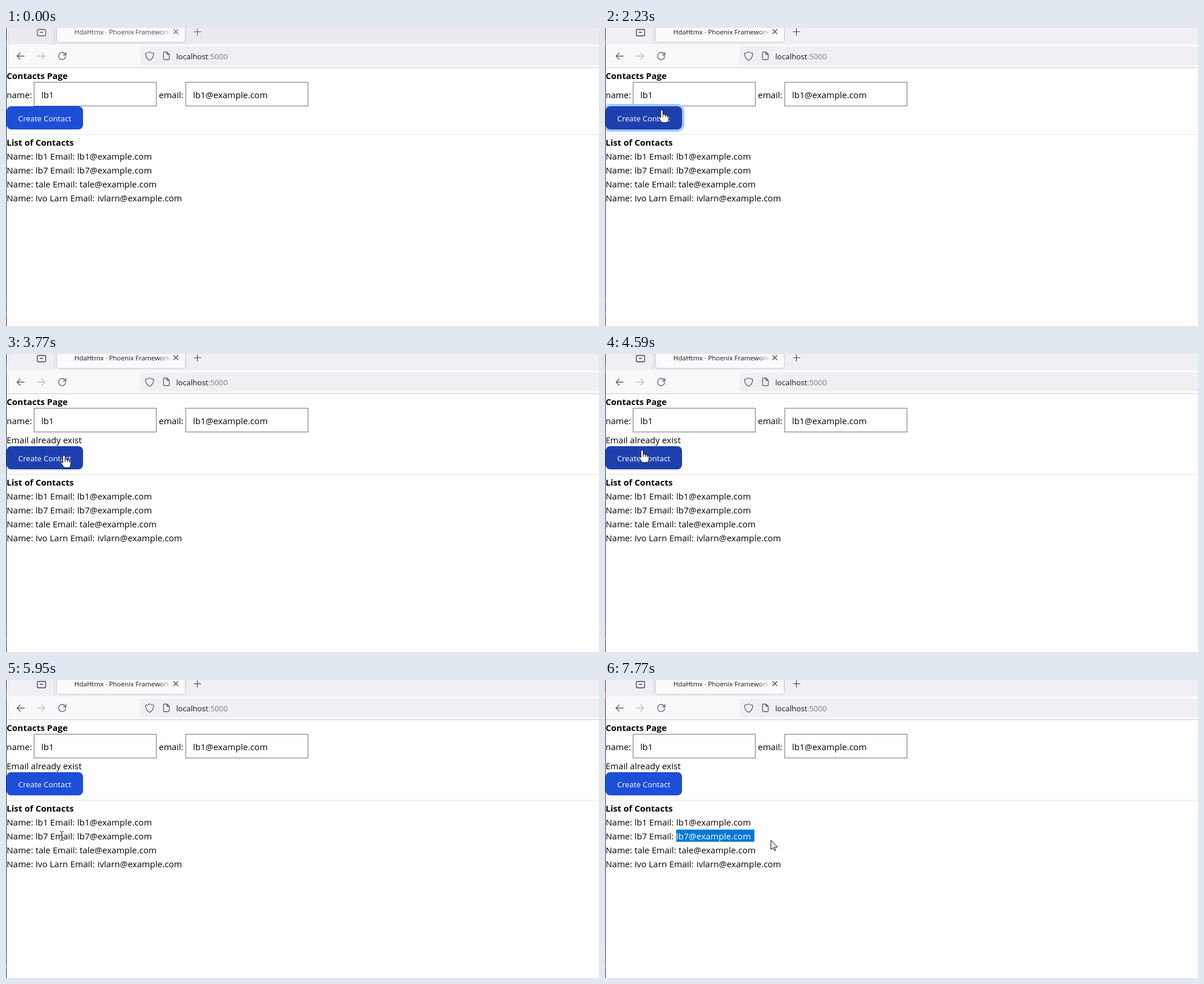
Write an HTML page that moves like this. It is 1024 by 514 pixels and loops after 8000 ms.

```html
<!DOCTYPE html>
<html lang="en">
<head>
<meta charset="utf-8">
<title>Contacts Page</title>
<style>
  html, body { margin: 0; width: 100%; height: 100%; overflow: hidden; background: #fff; }
  #stage { display: block; width: 1024px; height: 514px; }
  text { font: 15px "Open Sans", "Noto Sans", sans-serif; fill: #000; white-space: pre; }
  .bold { font-weight: 700; }
  .icon { fill: none; stroke: #5b5b66; stroke-width: 1.3; stroke-linecap: round; stroke-linejoin: round; }
  .field { fill: #fff; stroke: #6b7280; }
  #strip { fill: #ebebef; }
  #title { font-size: 11.4px; fill: #46464e; }
  .active #strip { fill: #f0f0f4; }
  .active #title { fill: #15141a; }
  .active .tabicon { stroke: #3a3a44; }
  #url { font-size: 13.2px; fill: #15141a; }
  #url tspan { fill: #7c7c85; }
  #label { font-size: 13.3px; fill: #fff; }
  #button { fill: #1d4ed8; }
  #button.hover { fill: #1e40af; }
  #ring { fill: none; stroke: #a4cafe; stroke-width: 4; }
  #picked text { fill: #fff; }
  #cursor path { fill: #fff; stroke: #000; stroke-linejoin: round; }
  #cursor #beam { fill: none; }
</style>
</head>
<body>
<svg id="stage" viewBox="0 0 1024 514">
  <defs>
    <linearGradient id="fade">
      <stop offset="0" stop-color="#fbfbfd" stop-opacity="0"/>
      <stop offset="1" stop-color="#fbfbfd"/>
    </linearGradient>
    <filter id="shadow" x="-5%" y="-30%" width="110%" height="160%">
      <feDropShadow dx="0" dy="0" stdDeviation="1.6" flood-color="#000" flood-opacity=".35"/>
    </filter>
  </defs>

  <g id="chrome">
    <rect id="strip" width="1024" height="28"/>
    <path d="M83.5 0V27" stroke="#cfcfd6"/>
    <rect x="88" y="-12" width="221" height="36" rx="4" fill="#fbfbfd" filter="url(#shadow)"/>
    <text id="title" x="118" y="11">HdaHtmx · Phoenix Framework</text>
    <rect x="264" y="0" width="21" height="16" fill="url(#fade)"/>
    <g class="icon tabicon">
      <path d="M56 2.5H66.5Q68.5 2.5 68.5 4.5V11.5Q68.5 13.5 66.5 13.5H56Q54 13.5 54 11.5V4.5Q54 2.5 56 2.5ZM59 7.5H63.5"/>
      <path d="M289.5 2.5L297 10M297 2.5L289.5 10" stroke-width="1.1"/>
      <path d="M330.5 1V12.5M325 6.5H336.5" stroke-width="1.1"/>
    </g>
    <rect y="28" width="1024" height="40" fill="#f9f9fb"/>
    <rect x="232" y="32" width="800" height="32" rx="4" fill="#f0f0f4"/>
    <path d="M0 68.5H1024" stroke="#cccccf"/>
    <g class="icon">
      <path d="M19 48.5H31.5M24.5 43L19 48.5L24.5 54"/>
      <path d="M54 48.5H67M61.5 43L67 48.5L61.5 54" stroke="#bdbdc3"/>
      <path d="M102.5 45.5A6.2 6.2 0 1 0 103.2 49M103.5 42V46.5H99"/>
      <path d="M248 41.2Q251 43 254.8 43.4Q255.5 52 248 55.8Q240.5 52 241.2 43.4Q245 43 248 41.2Z"/>
      <path d="M272 43Q272 41.5 273.5 41.5H278L282 45.5V53Q282 54.5 280.5 54.5H273.5Q272 54.5 272 53ZM278 41.5V45.5H282"/>
    </g>
    <text id="url" x="294" y="54">localhost<tspan>:5000</tspan></text>
  </g>

  <text class="bold" x="1" y="88">Contacts Page</text>
  <text x="1" y="121">name:</text>
  <rect class="field" x="48.5" y="93.5" width="211" height="41"/>
  <text x="61" y="121">lb1</text>
  <text x="264" y="121">email:</text>
  <rect class="field" x="310.5" y="93.5" width="211" height="41"/>
  <text x="323" y="121">lb1@example.com</text>
  <text id="error" x="1" y="154">Email already exist</text>

  <g id="below">
    <rect id="ring" x="-1" y="133" width="136" height="44" rx="10"/>
    <rect id="button" x="1" y="135" width="132" height="40" rx="8"/>
    <text id="label" x="21" y="161">Create Contact</text>
    <path d="M1 183.5H1024" stroke="#e5e7eb"/>
    <text class="bold" x="1" y="203">List of Contacts</text>
    <g id="rows"></g>
  </g>

  <svg id="picked" x="123" y="258" width="0" height="21">
    <rect width="135" height="21" fill="#0078d7"/>
    <text x="0" y="17">lb7@example.com</text>
  </svg>

  <path d="M.5 0V514" stroke="#2d2d31"/>
  <path d="M.5 20V31M.5 468V471M.5 490V495" stroke="#8a5038"/>

  <g id="cursor">
    <path id="arrow" d="M.5 .5V16.5L4.2 13L6.7 18.5L9 17.5L6.6 12.2H11.8Z"/>
    <g id="hand">
      <path d="M-2 14V2Q-2 .5 0 .5T2 2V8Q5 6.5 6 9Q9 8 9.5 10Q12 9.5 12 12V16Q12 19 10 22H0Q-2 18-5 14.5Q-6 12-4 11.5Q-3 12-2 14Z"/>
      <path d="M2 8V12.5M6 9V12.5M9.5 10V13"/>
    </g>
    <path id="beam" d="M-2.5-7.5H-.5L.5-6.5L1.5-7.5H3.5M.5-6.5V6.5M-2.5 7.5H-.5L.5 6.5L1.5 7.5H3.5"/>
  </g>
</svg>

<script>
const LOOP = 8000, TICK = 70, ENTER = 270;
const CLICK = 2160, ERROR = 2360, CLICK2 = 4040, RELEASE2 = 4190;
const DRAG = 7020, DROP = 7300;

// Pointer moves as [ms, x, y] waypoints; the pointer rests between moves.
const moves = [
  [[ENTER, 935, 495], [410, 640, 360], [620, 217, 195]],
  [[1340, 212, 193], [1620, 122, 160], [1890, 98, 141]],
  [[2830, 98, 152], [2970, 99, 168]],
  [[3170, 102, 158], [3310, 122, 141], [3450, 153, 144], [3770, 100, 174]],
  [[4520, 88, 168], [4590, 64, 165], [4720, 31, 175]],
  [[4990, 33, 190], [5120, 47, 225], [5330, 43, 250], [5740, 47, 267]],
  [[5810, 56, 264], [6150, 152, 277]],
  [[6350, 149, 276], [6760, 126, 270]],
  [[DRAG, 145, 268], [7160, 232, 266], [DROP, 290, 273]],
  [[7700, 278, 261], [7770, 286, 276]]
];

// Contact rows: name, mailbox, x of the address, right edge.
const contacts = [
  ["lb1", "lb1", 123, 253],
  ["lb7", "lb7", 123, 253],
  ["tale", "tale", 127, 261],
  ["Ivo Larn", "ivlarn", 158, 302]
];

const $ = id => document.getElementById(id);
const show = (id, on) => { $(id).style.display = on ? "" : "none"; };
const rowY = i => 227 + 24 * i;

$("rows").innerHTML = contacts.map(([name, box, x], i) =>
  `<text x="1" y="${rowY(i)}">Name: ${name} Email: <tspan x="${x}">${box}@example.com</tspan></text>`
).join("");
const address = $("rows").children[1].querySelector("tspan");

const shift = t => t >= ERROR ? 24 : 0;

function pointer(t) {
  const move = moves.filter(m => m[0][0] <= t).pop();
  if (!move) return null;
  const start = move[0][0], last = move[move.length - 1];
  if (t >= last[0]) return { x: last[1], y: last[2] };
  const s = start + TICK * Math.floor((t - start + 10) / TICK);
  const i = Math.max(1, move.findIndex(p => p[0] >= Math.min(s, last[0])));
  const [t0, x0, y0] = move[i - 1], [t1, x1, y1] = move[i];
  const k = Math.min(1, (s - t0) / (t1 - t0));
  return { x: Math.round(x0 + (x1 - x0) * k), y: Math.round(y0 + (y1 - y0) * k) };
}

function overButton(t) {
  const p = pointer(t), top = 135 + shift(t);
  return !!p && p.x >= 1 && p.x < 133 && p.y >= top && p.y < top + 40;
}

function overText(p, t) {
  const dy = shift(t);
  const inLine = (right, base) => p.x <= right && p.y > base - 17 && p.y < base + 6;
  return dy > 0 && inLine(131, 154) || inLine(117, 203 + dy) ||
    contacts.some((c, i) => inLine(c[3], rowY(i) + dy));
}

// Selection grows by whole letters and ends with the line break.
function pickedWidth(x) {
  if (x > 253) return 135;
  const length = n => n ? address.getSubStringLength(0, n) : 0;
  let n = 0;
  while (n < address.getNumberOfChars() && length(n + 1) <= x - 123) n++;
  return length(n);
}

function draw(t) {
  const p = pointer(t), onButton = overButton(t);
  $("chrome").classList.toggle("active", t >= CLICK);
  show("error", t >= ERROR);
  $("below").setAttribute("transform", `translate(0 ${shift(t)})`);
  show("ring", t >= CLICK && t < ERROR || t >= CLICK2 && t < RELEASE2);
  $("button").classList.toggle("hover", onButton && overButton(t - TICK));
  const dragX = t >= DRAG ? pointer(Math.min(t, DROP)).x : 0;
  $("picked").setAttribute("width", pickedWidth(dragX));

  show("cursor", p);
  if (!p) return;
  const kind = onButton ? "hand" : overText(p, t) ? "beam" : "arrow";
  for (const id of ["arrow", "hand", "beam"]) show(id, id === kind);
  $("cursor").setAttribute("transform", `translate(${p.x} ${p.y})`);
}

const began = performance.now();
function frame() {
  draw((performance.now() - began) % LOOP);
  requestAnimationFrame(frame);
}
frame();
</script>
</body>
</html>
```
